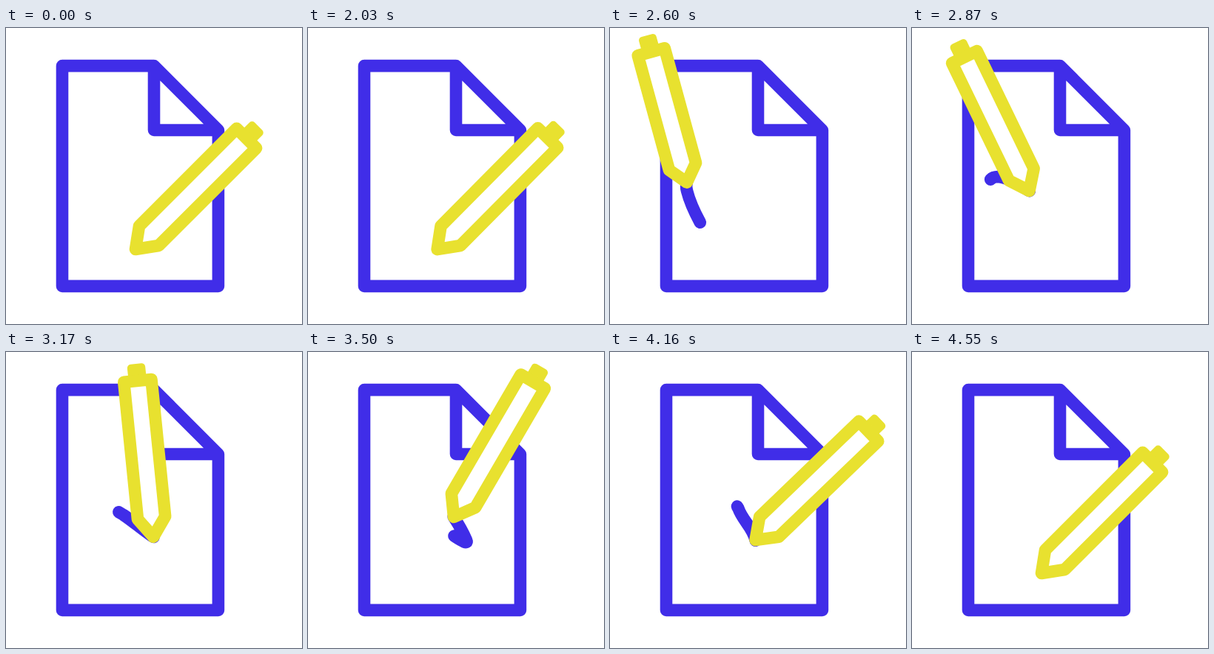
Recreate the animation shown at these times as an HTML page. Size 400 px wide and 400 px high, loop 4580 ms.

```html
<!DOCTYPE html>
<html lang="en">
<head>
<meta charset="utf-8">
<title>Writing pencil</title>
<style>
html, body { margin: 0; width: 100%; height: 100%; overflow: hidden; background: #fff; }
svg { display: block; width: 100vw; height: 100vh; }
path { stroke-width: 16.6; stroke-linejoin: round; stroke-linecap: round; fill: none; }
.blue { stroke: #402de8; }
.body { stroke: #e8e12f; fill: #fff; }
.cap { fill: #e8e12f; }
</style>
</head>
<body>
<svg viewBox="0 0 400 400">
  <path class="blue" d="M200 51.1H76V348.9H286.9V138L200 51.1V138H286.9"/>
  <path class="blue" id="ink"/>
  <g id="pencil">
    <rect class="cap" id="cap" x="-12.2" width="24.4" height="26" rx="5"/>
    <path class="body" id="body"/>
  </g>
</svg>
<script>
const LOOP = 4580, WAIT = 2030, STEP = 30, LEAD = 30;
const INK = 58, INK_START = 15;
const $ = id => document.getElementById(id);
const ink = $('ink'), pencil = $('pencil'), cap = $('cap'), body = $('body');

// The tip follows one continuous curve; bend < 0 starts slow, bend > 0 ends slow.
const strokes = [
  { end: 390, bend: -1, d: 'M175 299C168 301 164 301 160 300C149 297 138 289 128.5 275' },
  { end: 870, bend: 0.4, d: 'C119 258 109 240 104 220C101 208 106 201 116 201C130 202 145 212 158.5 220' },
  { end: 1500, bend: 0, d: 'C172 229 183 239 195 247C207 255 217 261 214 254Q208 240 197 223' },
  { end: 1890, bend: 0, d: 'C188 212 178 202 170 192C163 184 165 197 173.5 211.5' },
  { end: 2550, bend: 0.3, d: 'C179 228 196 240 197 258S186 292 175 299' }
];

// Pencil swings between these angles.
const swings = [[0, 45], [810, -26.5], [1820, 47], [2550, 45]];

let total = 0, route = '';
for (const s of strokes) {
  route += s.d;
  ink.setAttribute('d', route);
  s.from = total;
  total = ink.getTotalLength();
  s.length = total - s.from;
}

function travelled(t) {
  const i = strokes.findIndex(s => t <= s.end), s = strokes[i];
  const begin = i ? strokes[i - 1].end : 0;
  const u = (t - begin) / (s.end - begin);
  return s.from + s.length * (u + s.bend * u * (1 - u));
}

function tiltAt(t) {
  const i = Math.max(1, swings.findIndex(s => t <= s[0]));
  const [t0, a] = swings[i - 1], [t1, b] = swings[i];
  return a + (b - a) * (1 - Math.cos(Math.PI * (t - t0) / (t1 - t0))) / 2;
}

// The pencil looks shorter while it swings over the left edge.
const stretchAt = t => 1 - 0.15 * Math.exp(-(((t - 660) / 205) ** 2));

function draw(ms) {
  const t = ms < WAIT ? 0 : LEAD + Math.floor((ms - WAIT) / STEP) * STEP;
  const dist = travelled(t), tip = ink.getPointAtLength(dist);
  const s = stretchAt(t), top = -212 * s, base = -25.8 * s;
  pencil.setAttribute('transform', `translate(${tip.x} ${tip.y}) rotate(${tiltAt(t)})`);
  body.setAttribute('d', `M0 0L-18.7 ${base}V${top}H18.7V${base}Z`);
  cap.setAttribute('y', top - 23);

  const len = Math.min(INK, dist - INK_START, total - dist);
  ink.style.visibility = len > 1 ? 'visible' : 'hidden';
  ink.setAttribute('stroke-dasharray', `${Math.max(len, 1)} ${2 * total}`);
  ink.setAttribute('stroke-dashoffset', len - dist);
}

let origin;
function frame(now) {
  if (origin === undefined) origin = now;
  draw((now - origin) % LOOP);
  requestAnimationFrame(frame);
}
draw(0);
requestAnimationFrame(frame);
</script>
</body>
</html>
```
